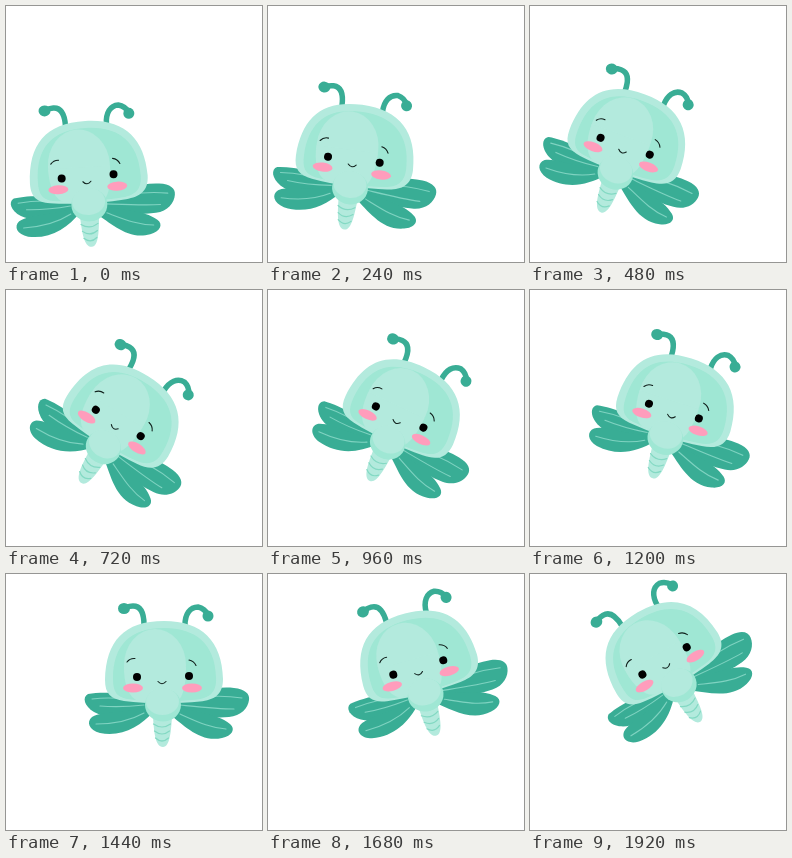
Animation, 256 px wide and 256 px high, one loop 2.16 s. Source, as an HTML page with a canvas:

```html
<!DOCTYPE html>
<html lang="en">
<head>
<meta charset="utf-8">
<title>Dragonfly</title>
<style>
html, body { margin: 0; width: 100%; height: 100%; overflow: hidden; background: #fff; }
canvas { display: block; width: 256px; height: 256px; }
</style>
</head>
<body>
<canvas id="stage" width="256" height="256"></canvas>
<script>
const ctx = document.getElementById('stage').getContext('2d');
const STEP = 240;

// Mouth position and tilt in degrees for each held pose
const poses = [
  [81, 177, -3.5], [84, 160, 7.7], [92, 146, 20],
  [108, 138, 31.5], [128, 132.5, 25], [141, 127, 17.5],
  [156, 109, 0], [151, 100, -15], [137, 93, -30.5]
];

const GREEN = '#39ad95', VEIN = '#7fd3c1', PALE = '#b3eadd',
      MINT = '#9fe7d4', SHADE = '#83d9c3', PINK = '#ff9dbc', INK = '#10201c';

function fill(d, color) {
  ctx.fillStyle = color;
  ctx.fill(new Path2D(d));
}

function line(d, color, width) {
  ctx.strokeStyle = color;
  ctx.lineWidth = width;
  ctx.stroke(new Path2D(d));
}

function oval(x, y, rx, ry, color, tilt = 0) {
  ctx.fillStyle = color;
  ctx.beginPath();
  ctx.ellipse(x, y, rx, ry, tilt, 0, Math.PI * 2);
  ctx.fill();
}

function drawWings() {
  fill('M10 12C30 9 54 3 72 5C83 6 88 11 87 17C86 25 79 33 67 34C45 36 25 30 8 22Z', GREEN);
  fill('M8 22C32 29 55 30 68 41C74 46 70 53 60 55C38 60 22 42 7 31Z', GREEN);
  fill('M-10 14C-30 11 -58 8 -74 11C-80 14 -78 23 -68 29C-52 38 -28 32 -8 22Z', GREEN);
  fill('M-8 22C-30 30 -58 27 -70 34C-76 39 -73 47 -62 50C-40 54 -22 44 -8 28Z', GREEN);
  line('M16 18C38 13 60 12 80 15M18 22C38 24 56 26 72 26M18 31C36 39 48 45 64 46', VEIN, 1.1);
  line('M-16 19C-36 15 -54 14 -70 16M-18 22C-36 24 -50 24 -62 23M-18 30C-34 39 -50 41 -66 41', VEIN, 1.1);
}

function drawAntennae() {
  line('M-18 -58C-18 -70 -21 -77 -29 -77C-33 -77 -35 -76 -38 -75', GREEN, 5.5);
  oval(-38, -74.5, 6, 5.5, GREEN);
  line('M23 -58C23 -69 28 -76 36 -76C41 -75 44 -72 46 -68', GREEN, 5.5);
  oval(46, -67, 5.5, 5.5, GREEN);
}

function drawTail() {
  fill('M-9 34L10 34C9 48 8 64 1 64C-7 64 -8 48 -9 34Z', PALE);
  for (let i = 0; i < 3; i++) {
    const y = 41 + i * 7, w = 8.5 - i;
    line(`M${-w} ${y}Q0 ${y + 6} ${w} ${y}`, SHADE, 1.2);
  }
}

function drawHead() {
  fill('M-57 -3C-56 -42 -38 -62 2 -62C40 -62 60 -42 61 -4C61 12 52 17 38 18.5C15 21 -15 21 -38 18C-51 16 -57 11 -57 -3Z', PALE);
  fill('M-49 -4C-49 -38 -32 -55 2 -55C35 -55 53 -38 54 -6C55 10 47 15 35 16.5C14 19 -14 19 -35 16C-45 14 -49 9 -49 -4Z', MINT);
  oval(-7, -18, 31, 36, PALE);
  fill('M-38 -16L24 -16C24 4 20 19 12 19L-24 18C-34 14 -38 0 -38 -16Z', PALE);
}

function drawBody() {
  oval(1, 22, 18, 16.5, MINT);
  oval(0.5, 18.5, 16.5, 13.5, PALE);
}

function drawFace() {
  oval(-29, 5, 10, 4.5, PINK);
  oval(30, 5, 10, 4.5, PINK);
  oval(-25, -6, 4, 4, '#000');
  oval(27, -7, 4, 4, '#000');
  line('M-35 -21Q-32 -25 -27 -24.5M27 -23Q32 -22 34 -17.5', INK, 1.1);
  line('M-4 -1.5Q0 3 4 -1.5', INK, 1.1);
}

function render(now) {
  const [x, y, tilt] = poses[Math.floor(now / STEP) % poses.length];
  ctx.clearRect(0, 0, 256, 256);
  ctx.save();
  ctx.translate(x, y);
  ctx.rotate(tilt * Math.PI / 180);
  ctx.lineCap = 'round';
  drawWings();
  drawAntennae();
  drawTail();
  drawHead();
  drawBody();
  drawFace();
  ctx.restore();
}

const start = performance.now();
function tick() {
  render(performance.now() - start);
  requestAnimationFrame(tick);
}
tick();
</script>
</body>
</html>
```
